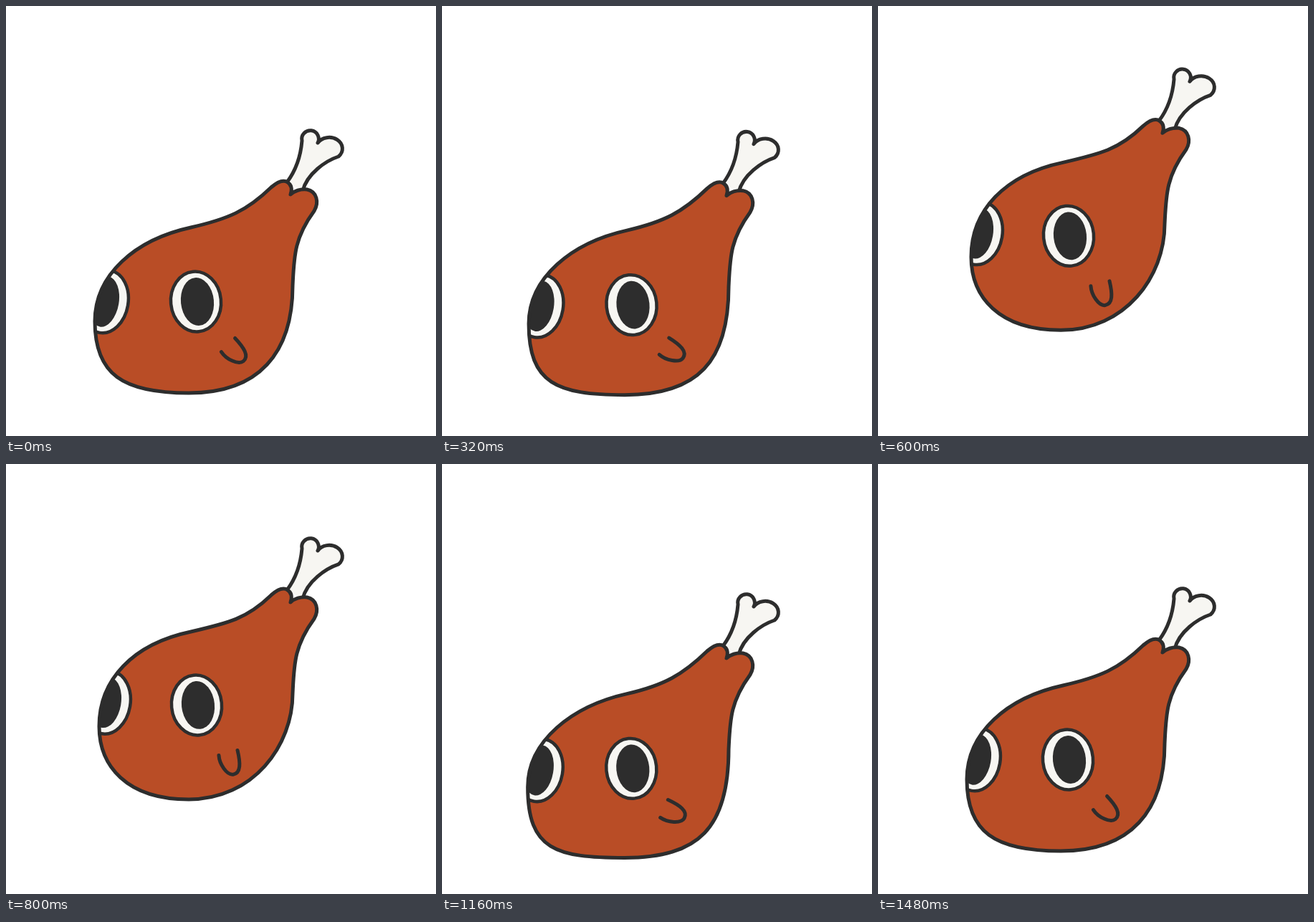
An HTML page with a canvas that plays this animation: 600x600 px, repeating every 2000 ms.

```html
<!DOCTYPE html>
<html>
<head>
<meta charset="utf-8">
<style>
  html, body { margin: 0; height: 100%; overflow: hidden; background: #fff; }
  canvas { display: block; }
</style>
</head>
<body>
<canvas id="stage" width="600" height="600"></canvas>
<script>
const ctx = document.getElementById('stage').getContext('2d');
const INK = '#2d2d2d', MEAT = '#b94d26', WHITE = '#f7f6f2';
const LOOP = 2000, STEP = 40;

// [time, value] keys: vertical offset, and stretch (1 tall, negative squashed)
const HOP = [[0, 0], [260, 7], [660, -91], [1120, 8], [1160, 8], [1480, 0]];
const STRETCH = [[0, 0], [260, -0.8], [480, 1], [1000, 1], [1120, -0.8], [1320, 0]];

const BONE = new Path2D('M392 246 C404 230 411 212 413 188 A11.8 11.8 0 1 1 435 191 ' +
  'A18.5 15.6 0 1 1 464 210 C446 216 420 234 414 258');
const MOUTH = new Path2D('M0 13.5 C12 16 30 10 31 1 C32 -10 18 -13 0 -13.5');

function valueAt(keys, t) {
  const i = keys.findIndex(key => key[0] > t);
  if (i < 0) return keys[keys.length - 1][1];
  const [t0, a] = keys[i - 1], [t1, b] = keys[i];
  return a + (b - a) * (1 - Math.cos(Math.PI * (t - t0) / (t1 - t0))) / 2;
}

// The neck stays rigid while the round end shifts with the stretch s
function bodyPath(s) {
  const left = 124 + 6 * s, side = 440 - 4 * s;
  const bottom = 540 - 2 * s, shoulder = 309 - 5 * s;
  return new Path2D(`M370 253 C378 246 386 241 393 246 C399 250 399 257 397 263
    C402 258 411 255 420 256 C434 259 437 274 430 286
    C402 324 402 350 400 390
    C400 ${484 - 21 * s} ${353 - 8 * s} ${bottom} 255 ${bottom}
    C${163 + 5 * s} ${bottom} ${left} ${514 - 23 * s} ${left} ${side}
    C${left} ${side - 65} ${180 - 3 * s} ${shoulder + 17} 258 ${shoulder}
    C310 ${shoulder - 12} 336 286 370 253 Z`);
}

function paint(path, fill, width) {
  if (fill) {
    ctx.fillStyle = fill;
    ctx.fill(path);
  }
  if (width) {
    ctx.lineWidth = width;
    ctx.stroke(path);
  }
}

function oval(x, y, rx, ry, tilt) {
  const path = new Path2D();
  path.ellipse(x, y, rx, ry, tilt, 0, Math.PI * 2);
  return path;
}

function eye(x, y, rx, ry, tilt, pupilShift) {
  paint(oval(x, y, rx, ry, tilt), WHITE, 4.5);
  paint(oval(x + pupilShift, y, rx - 12, ry - 8.5, tilt), INK);
}

function draw(t) {
  const s = valueAt(STRETCH, t);
  const body = bodyPath(s);

  ctx.setTransform(1, 0, 0, 1, 0, 0);
  ctx.clearRect(0, 0, 600, 600);
  ctx.translate(0, valueAt(HOP, t));
  ctx.strokeStyle = INK;
  ctx.lineCap = ctx.lineJoin = 'round';

  paint(BONE, WHITE, 5);
  paint(body, MEAT);

  ctx.save();
  ctx.clip(body);
  eye(138 + 3 * s, 412.5 - 9.5 * s, 32.5, 44, 0.17, -1);
  ctx.restore();
  eye(265 + s, 412.5 - 6 * s, 35, 42, -0.1, 2);
  paint(body, null, 5);

  // The smile is a hook that swings down as the body stretches
  ctx.translate(310, 473);
  ctx.rotate((45 + 30 * s) * Math.PI / 180);
  paint(MOUTH, null, 5);
}

function tick() {
  const t = performance.now() % LOOP;
  draw(Math.floor(t / STEP) * STEP);
  requestAnimationFrame(tick);
}
tick();
</script>
</body>
</html>
```
